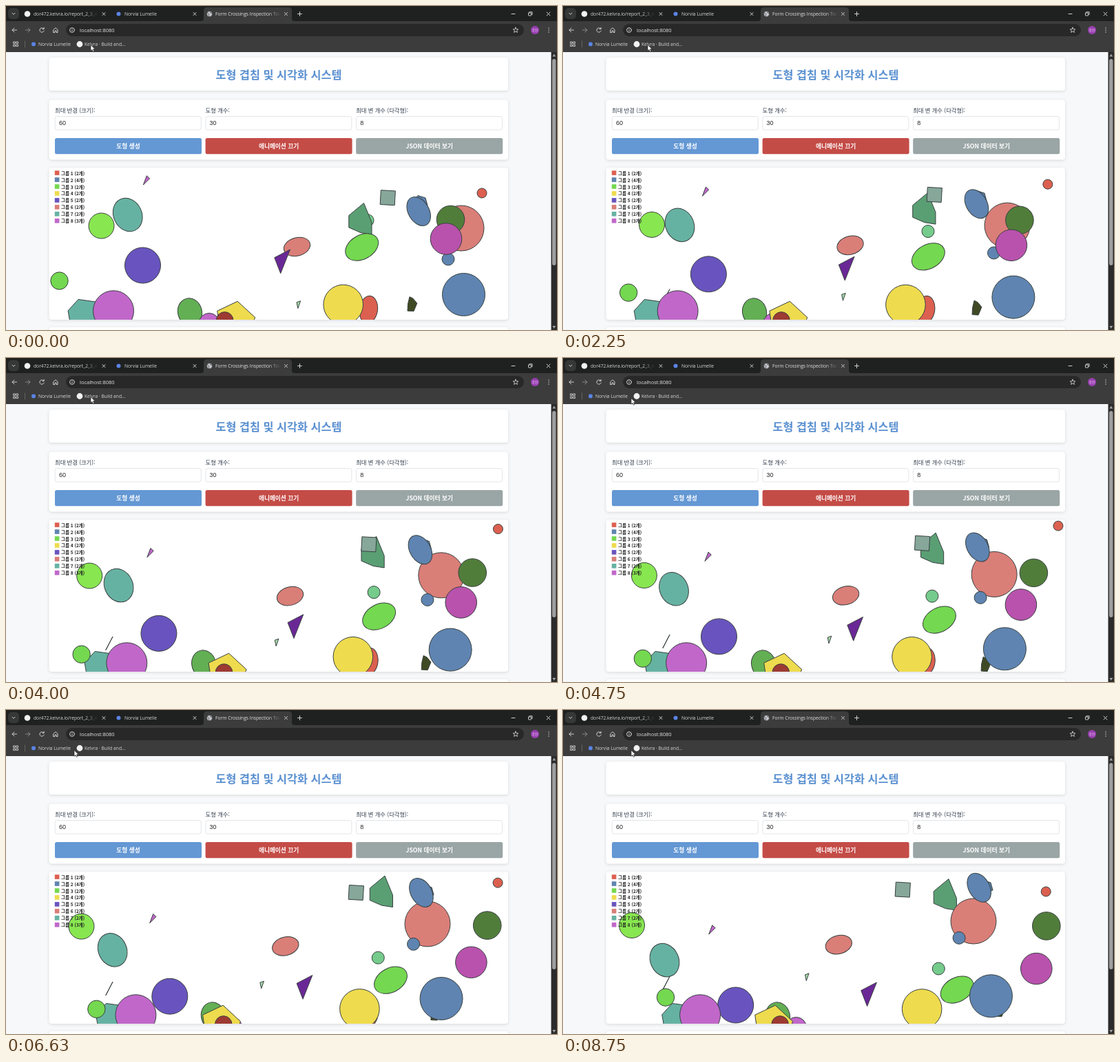
Write an HTML page that moves like this. It is 800 px wide and 471 px high and loops after 8.81 s.

```html
<!DOCTYPE html>
<html lang="ko">
<head>
<meta charset="utf-8">
<title>Drifting figures</title>
<style>
  html, body { margin: 0; width: 100%; height: 100%; overflow: hidden; background: #f7f8fa; }
  svg { display: block; position: absolute; left: 0; top: 0; }
  text { font-family: "Open Sans", "Noto Sans CJK KR", "Noto Sans CJK", sans-serif; }
  .ko text, text.ko { font-family: "Noto Sans CJK KR", "Noto Sans CJK", sans-serif; }
  .ui { fill: #d6d6d6; font-size: 6.7px; }
  .icon { fill: none; stroke: #d0d0d0; stroke-width: 1; stroke-linecap: round; stroke-linejoin: round; }
  .label { fill: #2f3c4d; font-size: 8.3px; font-weight: 500; }
  .ko text.field { fill: #222; font: 9px "Liberation Sans", sans-serif; }
  .button { fill: #fff; font-size: 8.7px; font-weight: 700; text-anchor: middle; }
  .legend { fill: #222; font-size: 6.5px; font-weight: 700; }
  .card { fill: #fff; filter: drop-shadow(0 1px 2px rgba(0, 0, 0, .13)); }
  #movers > * { stroke: #37403f; stroke-width: 1; stroke-linejoin: miter; }
</style>
</head>
<body>
<svg width="800" height="471" viewBox="0 0 800 471">
  <defs>
    <clipPath id="board"><rect x="62.5" y="235" width="666.5" height="221" rx="4"/></clipPath>
    <linearGradient id="fadeA" gradientUnits="userSpaceOnUse" x1="116" x2="133">
      <stop stop-color="#d6d6d6"/><stop offset="1" stop-color="#d6d6d6" stop-opacity="0"/>
    </linearGradient>
    <linearGradient id="fadeB" gradientUnits="userSpaceOnUse" x1="382" x2="399">
      <stop stop-color="#e2e2e2"/><stop offset="1" stop-color="#e2e2e2" stop-opacity="0"/>
    </linearGradient>
  </defs>

  <!-- page -->
  <rect width="800" height="471" fill="#f7f8fa"/>
  <g class="ko">
    <rect class="card" x="62.5" y="75" width="666.5" height="48" rx="4"/>
    <text x="396" y="105.5" fill="#5a90d0" font-size="16.3" font-weight="700" text-anchor="middle">도형 겹침 및 시각화 시스템</text>
    <rect class="card" x="62.5" y="136.5" width="666.5" height="87" rx="4"/>
    <g id="form"></g>
    <rect class="card" x="62.5" y="235" width="666.5" height="221" rx="4"/>
    <g id="movers" clip-path="url(#board)"></g>
    <g id="legend"></g>
    <rect class="card" x="62.5" y="467" width="666.5" height="30" rx="4"/>
  </g>

  <!-- scrollbar -->
  <rect x="791.5" y="67" width="8.5" height="404" fill="#2b2b2b"/>
  <rect x="793" y="77" width="5.5" height="300" rx="2.7" fill="#9e9e9e"/>
  <path d="M793.3 73.5l2.5-4 2.5 4zM793.3 465l2.5 4 2.5-4z" fill="#9e9e9e"/>

  <!-- browser window -->
  <rect width="800" height="24" fill="#1f2020"/>
  <rect y="22" width="800" height="45" fill="#3c3c3c"/>
  <path d="M283 22q4 0 4-4V7q0-5 5-5h118q5 0 5 5v11q0 4 4 4z" fill="#3c3c3c"/>
  <rect x="3" y="3" width="16" height="16" rx="5" fill="#363737"/>
  <rect x="87" y="26" width="665" height="18" rx="9" fill="#282828"/>
  <g class="icon">
    <path d="M9 10.3l2 2 2-2"/>
    <g id="crosses"></g>
    <path d="M423.5 11.5h6M426.5 8.5v6M734 11.5h5M785 9l5 5M790 9l-5 5"/>
    <rect x="758.5" y="10" width="4" height="4" rx=".6"/>
    <path d="M760 8.7h4v4"/>
    <path d="M15.5 35h-6.5M12 32l-3 3 3 3"/>
    <path d="M28.5 35h6.5M32 32l3 3-3 3" stroke="#8b8b8b"/>
    <path d="M54.8 33.2a3.2 3.2 0 1 0 .4 2.8M55.2 31.3v2.2h-2.2"/>
    <path d="M69 34.5l3-2.8 3 2.8v4h-2v-2.5h-2v2.5h-2z"/>
    <circle cx="96" cy="35" r="3.4"/><path d="M96 34.8v1.7M96 33.2v.1"/>
    <path d="M740 31.2l1.1 2.5 2.7.2-2.1 1.8.7 2.7-2.4-1.5-2.4 1.5.7-2.7-2.1-1.8 2.7-.2z" stroke-width=".9"/>
    <path d="M788 32v.1M788 35v.1M788 38v.1" stroke-width="1.5"/>
    <path d="M11 52h2.4v2.4H11zM15.2 52h2.4v2.4h-2.4zM11 56.2h2.4v2.4H11zM15.2 56.2h2.4v2.4h-2.4z" stroke-width=".9"/>
    <path d="M27.5 51v9" stroke="#636363"/>
  </g>
  <circle cx="31" cy="11.5" r="4.3" fill="#f2f2f2"/>
  <circle cx="163.5" cy="11.5" r="3" fill="#5b84e4"/>
  <g fill="none" stroke="#3c3c3c" stroke-width=".7">
    <circle cx="295.5" cy="11.5" r="4" fill="#c9ccd0"/>
    <path d="M292 10l3 1.5-.5 3M296 8l1 2 2.5.5"/>
  </g>
  <circle cx="40" cy="55.5" r="3" fill="#5b84e4"/>
  <circle cx="107" cy="55.5" r="4.4" fill="#f2f2f2"/>
  <circle cx="768" cy="35" r="6" fill="#9a3fb2"/>
  <text class="ko" x="768" y="36.7" fill="#ecd8f2" font-size="4.6" text-anchor="middle">주안</text>
  <g class="ui">
    <text x="40" y="14" style="fill:url(#fadeA)">dor472.kelvra.io/report_2_3_4</text>
    <text x="172" y="14">Norvia Lumelle</text>
    <text x="304" y="14" style="fill:url(#fadeB)">Form Crossings Inspection Tool</text>
    <text x="107" y="37.7" style="fill:#e6e6e6;font-size:7.5px">localhost:8080</text>
    <text x="47" y="57.8">Norvia Lumelle</text>
    <text x="114" y="57.8">Kelvra · Build and...</text>
  </g>
  <path id="cursor" d="M0 0v8.8l2-1.9 1.4 3 1.5-.7-1.4-2.9h2.8z" fill="#fff" stroke="#111" stroke-width=".6"/>
</svg>

<script>
const LOOP = 8810, TICK = 62.5;
const RED = "#dc6050", BLUE = "#5f84b1", GREEN = "#74d850", YELLOW = "#eedb4e",
      INDIGO = "#6954bf", SALMON = "#da7e78", TEAL = "#66b2a2", ORCHID = "#c167ca";

const byId = id => document.getElementById(id);

function add(parent, tag, attrs, text) {
  const el = document.createElementNS("http://www.w3.org/2000/svg", tag);
  for (const key in attrs) el.setAttribute(key, attrs[key]);
  if (text) el.textContent = text;
  parent.append(el);
  return el;
}

// --- form, legend, tab crosses ---
const fields = [
  ["최대 반경 (크기):", "60", "도형 생성", "#6498d4"],
  ["도형 개수:", "30", "애니메이션 끄기", "#c44c47"],
  ["최대 변 개수 (다각형):", "8", "JSON 데이터 보기", "#9aa5a5"]
];
fields.forEach(([label, value, action, color], i) => {
  const form = byId("form"), x = 71 + i * 218.6;
  add(form, "text", { class: "label", x, y: 154.5 }, label);
  add(form, "rect", { x: x + .25, y: 160.5, width: 212, height: 19.5, rx: 2.5, fill: "#fff", stroke: "#dcdfe3", "stroke-width": .8 });
  add(form, "text", { class: "field", x: x + 6, y: 173.3 }, value);
  add(form, "rect", { x, y: 192, width: 213, height: 23.3, rx: 2.5, fill: color });
  add(form, "text", { class: "button", x: x + 106.5, y: 207 }, action);
});

const groups = [[RED, 2], [BLUE, 4], [GREEN, 2], [YELLOW, 2], [INDIGO, 2], [SALMON, 2], [TEAL, 2], [ORCHID, 3]];
groups.forEach(([fill, count], i) => {
  const y = 239.3 + i * 9.95;
  add(byId("legend"), "rect", { x: 70.8, y, width: 6.6, height: 6.6, fill });
  add(byId("legend"), "text", { class: "legend", x: 80, y: y + 6.3 }, `그룹 ${i + 1} (${count}개)`);
});

for (const x of [142, 274, 406.5])
  add(byId("crosses"), "path", { d: `M${x - 2} 9.5l4 4m0-4l-4 4` });

// --- drifting figures: start, speed per tick, ticks at which a wall turns them back ---
const movers = [];

function mover(tag, attrs, fill, x, y, vx, vy, turnX = Infinity, turnY = Infinity, tilt = 0) {
  const el = add(byId("movers"), tag, { ...attrs, fill });
  movers.push({ el, x, y, vx, vy, turnX, turnY, tilt });
}
const circle = (fill, r, ...path) => mover("circle", { r }, fill, ...path);
const oval = (fill, rx, ry, tilt, x, y, vx, vy, turnY) =>
  mover("ellipse", { rx, ry }, fill, x, y, vx, vy, Infinity, turnY, tilt);
const poly = (fill, points, ...path) => mover("polygon", { points }, fill, ...path);

circle(RED, 7, 691, 272, .378, -.378, 82.5, 79.6);
circle("#75cb8b", 9, 525, 311.7, .147, .466);
poly("#5a9f73", "0,0 11.5,28 11.5,45.5 -4.5,43 -21.7,35.5 -21.7,18", 519.5, 286.5, .293, -.437, Infinity, 115.8);
poly("#86a79a", "-9.7,-11 11.4,-9.8 10.2,11 -10.8,9.8", 554, 278.7, -.442, -.127);
oval(GREEN, 25.6, 17.4, -29, 516.7, 350.5, .402, .406);

circle(SALMON, 33, 661, 323, -.471, -.116);
circle("#517d3b", 20.3, 645.5, 310.5, .512, .025, 124);
circle(BLUE, 9, 642, 368, -.485, -.266);
circle("#b952ad", 22.8, 639, 338.5, .35, .272);
poly(BLUE, "0,0 -3,-11 -14,-14.5 -19,-8 -17,6 -8,2", 612, 290, .087, -.203);
oval(BLUE, 22.6, 15.1, 60, 599.2, 298.5, .036, -.318, 132.4);

poly("#3f4a24", "-3,-10.5 2,-8 7.8,-1 3,10.5 -6,10 -5.5,0", 589, 433.2, .326, .16, Infinity, 75);
circle(BLUE, 31, 664.5, 419.5, -.312, .11, Infinity, 52);
oval(RED, 13.2, 20, 8, 526.3, 441.3, .008, 0);
circle(YELLOW, 28.8, 489.7, 434, .228, .004);

oval(SALMON, 19.5, 13.3, -15, 422.5, 350, -.161, -.064);
poly("#6a2896", "0,0 -22.7,11.8 -13.8,34.7", 412.5, 354, .311, .304);
poly("#a5d8a8", "0,0 5.6,-2 1.8,8.8", 422, 430.8, -.511, -.333);
poly(ORCHID, "0,0 4.3,4 -5,13.3", 204.3, 246.8, .09, .478);

oval(TEAL, 25, 20.5, 65, 176.7, 303.5, -.212, .436);
circle("#88e650", 18.5, 138.5, 319.5, -.279, -.047);
poly(TEAL, "0,0 15,-16.5 40,-13 55,2 50,32 5,28", 90, 443, .389, 0);
poly("#a9bdb2", "0,0 -10.3,19.5 -10,19.7", 155, 419.5, 0, -.234);
circle(INDIGO, 26, 198.5, 377, .378, .377);
circle(ORCHID, 29.5, 156, 443.3, .312, 0);
circle(GREEN, 12.7, 77.5, 399.5, .518, .505, Infinity, 87);

oval("#63af54", 20.3, 17.4, 75, 267, 445, .326, 0);
circle(ORCHID, 15, 295, 461.5, .315, 0);
poly(YELLOW, "0,0 25.5,23.5 14,51 -24,51 -29.5,14", 336.2, 429.3, -.203, 0);
circle("#9d3a32", 12.3, 317.6, 457, -.018, 0);

// --- time ---
const travelled = (n, turn) => n < turn ? n : 2 * turn - n;

// The motion waits briefly after the first tick.
const tickAt = t => t < 70 ? 0 : t < 250 ? 1 : 2 + Math.floor((t - 250) / TICK);

function draw(t) {
  const n = tickAt(t);
  for (const m of movers) {
    const x = m.x + m.vx * travelled(n, m.turnX);
    const y = m.y + m.vy * travelled(n, m.turnY);
    m.el.setAttribute("transform", `translate(${x.toFixed(2)} ${y.toFixed(2)}) rotate(${m.tilt})`);
  }
  const p = Math.min(1, Math.max(0, (n - 64) / 5));
  const ease = p * p * (3 - 2 * p);
  byId("cursor").setAttribute("transform", `translate(${123 - 24 * ease} ${56.5 + 2 * ease})`);
}

const start = performance.now();
function frame() {
  draw((performance.now() - start) % LOOP);
  requestAnimationFrame(frame);
}
frame();
</script>
</body>
</html>
```
